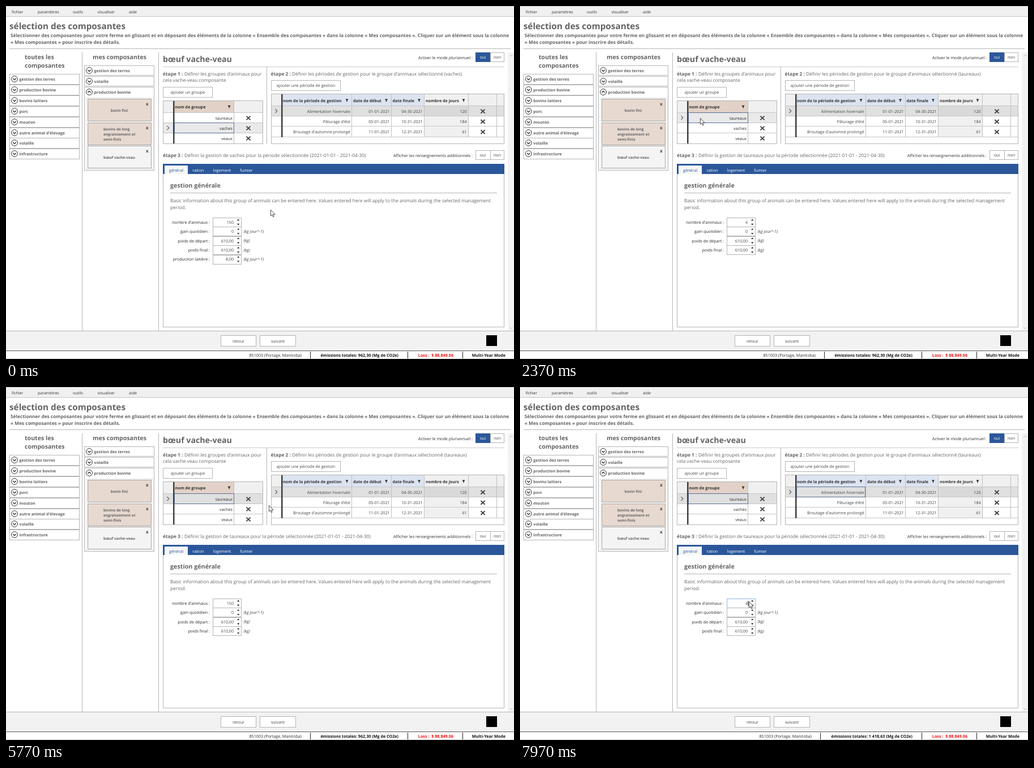
An HTML page for the animation above (8000 ms loop, 897 by 624 pixels).

```html
<!DOCTYPE html>
<html lang="fr">
<head>
<meta charset="utf-8">
<style>
html, body { margin: 0; width: 100%; height: 100%; overflow: hidden; background: #fff; }
svg { display: block; width: 897px; height: 624px; font: 7.2px "Open Sans", "Noto Sans", sans-serif; }
text { white-space: pre; text-rendering: geometricPrecision; }
</style>
</head>
<body>
<svg viewBox="0 0 897 624">
  <defs>
    <linearGradient id="navy" x2="0" y2="1"><stop stop-color="#285596"/><stop offset="1" stop-color="#133a75"/></linearGradient>
    <clipPath id="sub"><rect x="445" y="200" width="60" height="40"/></clipPath>
  </defs>
  <g id="still"></g>
  <g id="live"></g>
</svg>
<script>
const LOOP = 8000, BLUE = '#2b579a', GREY = '#646464', INK = '#2a2a2a', EDGE = '#b4b4b4';

// Drawing helpers, each returning SVG markup
const text = (s, x, y, o = {}) =>
  `<text x="${x}" y="${y}" font-size="${o.size || 7.2}" fill="${o.fill || INK}" text-anchor="${o.at || 'start'}"` +
  `${o.bold ? ' font-weight="700"' : ''}${o.italic ? ' font-style="italic"' : ''}>${s}</text>`;
const bold = (s, x, y, size = 7.2, fill = GREY, at) => text(s, x, y, { size, fill, at, bold: true });
const right = (s, x, y, fill) => text(s, x, y, { at: 'end', fill });
const mid = (s, x, y, fill) => text(s, x, y, { at: 'middle', fill });
const fill = (x, y, w, h, c) => `<rect x="${x}" y="${y}" width="${w}" height="${h}" fill="${c}"/>`;
const box = (x, y, w, h, c = '#fff', edge = EDGE) =>
  `<rect x="${x + .5}" y="${y + .5}" width="${w - 1}" height="${h - 1}" fill="${c}" stroke="${edge}"/>`;
const path = (d, c, w = 1, f = 'none') => `<path d="${d}" fill="${f}" stroke="${c}" stroke-width="${w}"/>`;
const hline = (x, y, x2, c = EDGE) => fill(x, y, x2 - x, 1, c);
const vline = (x, y, y2, c = EDGE) => fill(x, y, 1, y2 - y, c);
const button = (s, x, y, w, h) => box(x, y, w, h) + mid(s, x + w / 2, y + h / 2 + 2.6, '#444');
const funnel = (x, y) => path(`M${x - 2.7} ${y - 2.5}h5.4l-2 2.5v2.6l-1.4-.8v-1.8z`, 'none', 0, '#222');
const cross = (x, y) => path(`M${x - 3.6} ${y - 3.4}l7.2 6.8m0-6.8l-7.2 6.8`, '#444', 1.9);
const arrow = (x, y) => path(`M${x - 1.5} ${y - 3.5}l3.2 3.5l-3.2 3.5`, '#444', 1.1);

function accordion(s, x, y, w, h, up) {
  const k = up ? -1 : 1;
  return box(x, y, w, h) + `<circle cx="${x + 9}" cy="${y + 9}" r="5.4" fill="#fff" stroke="#333"/>` +
    path(`M${x + 6.4} ${y + 9 - k}l2.6 ${2.6 * k}l2.6 ${-2.6 * k}`, '#222', 1.3) + bold(s, x + 17.6, y + 12, 7.1);
}

function card(lines, y, c) {
  const first = y + 23 - (lines.length - 1) * 4.7;
  return box(144, y, 113, 40, c, '#a5a09c') + bold('x', 247, y + 12, 8, '#444') +
    lines.map((s, i) => lines.length > 1 ? bold(s, 172, first + i * 9.2, 6.5) : bold(s, 200, first, 6.5, GREY, 'middle')).join('');
}

function toggle(y, on) {
  return box(829, y, 27, 17, on ? BLUE : '#fff', on ? BLUE : EDGE) + box(855, y, 25, 17) +
    mid('oui', 842, y + 11.2, on ? '#fff' : '#444') + mid('non', 867.5, y + 11.2, '#444');
}

function drawStill() {
  let s = fill(0, 0, 897, 19, '#f0f0f0') + hline(0, 0, 897, '#c4c4c4') + hline(0, 18, 897, '#c4c4c4');
  [['fichier', 10], ['paramètres', 56], ['outils', 118], ['visualiser', 161.5], ['aide', 217]]
    .forEach(([w, x]) => s += text(w, x, 12.6, { size: 7, fill: '#333' }));
  s += bold('sélection des composantes', 6, 41, 15.3) +
    bold('Sélectionner des composantes pour votre ferme en glissant et en déposant des éléments de la colonne « Ensemble des composantes » dans la colonne « Mes composantes ». Cliquer sur un élément sous la colonne', 8, 55.3, 8.33) +
    bold('« Mes composantes » pour inscrire des détails.', 8, 66.8, 8.33) +
    hline(6, 75, 891) + vline(134, 82, 574) + vline(269, 82, 574);

  s += bold('toutes les', 33, 94, 10.6) + bold('composantes', 33, 109, 10.6) + bold('mes composantes', 153, 94, 10.6);
  ['gestion des terres', 'production bovine', 'bovins laitiers', 'porc', 'mouton', "autre animal d'élevage", 'volaille', 'infrastructure']
    .forEach((w, i) => s += accordion(w, 6, 120 + Math.round(i * 18.9), 124, 19));
  s += accordion('gestion des terres', 138, 105, 124, 18) + accordion('volaille', 138, 124, 124, 18) +
    accordion('production bovine', 138, 143, 124, 148, true) + box(141, 162, 119, 127, '#fff', '#e2e2e2') +
    card(['bovin fini'], 164, '#e7d9d0') + card(['bovins de long', 'engraissement et', 'semi-finis'], 206, '#e7d9d0') +
    card(['bœuf vache-veau'], 247, '#f4f4f4');

  s += bold('bœuf vache-veau', 277, 98.5, 14.2) + right('Activer le mode pluriannuel :', 824, 94) + toggle(82, true) +
    hline(277, 107, 880, '#cacaca') + vline(460, 108, 244) +
    bold('étape 1 :', 277, 122.6, 8.4) + text("Définir les groupes d'animaux pour", 315, 122.6, { size: 8.33, fill: GREY }) +
    text('cela vache-veau composante', 277, 134, { size: 8.33, fill: GREY }) + button('ajouter un groupe', 277, 143, 88, 19) +
    bold('étape 2 :', 467.5, 122.6, 8.4) + button('ajouter une période de gestion', 468, 131, 123, 19) +
    bold('étape 3 :', 277, 267.3, 8.4) + right('Afficher les renseignements additionnels :', 824, 267) + toggle(255, false);

  s += box(277, 279, 603, 289) + fill(277, 279, 603, 18, BLUE) + fill(280, 282, 41, 15, '#f7f7f7') +
    mid('général', 300.5, 292.6, BLUE);
  [['ration', 339.5], ['logement', 381.5], ['fumier', 424.5]].forEach(([w, x]) => s += mid(w, x, 292.6, '#fff'));
  s += bold('gestion générale', 290, 321, 10.74) + hline(290, 330, 867) +
    text('Basic information about this group of animals can be entered here. Values entered here will apply to the animals during the selected management', 290, 347, { size: 8.33, fill: GREY }) +
    text('period.', 290, 358.8, { size: 8.33, fill: GREY });

  s += fill(886, 82, 11, 492, '#f3f3f3') + path('M889.5 89l2.5-2.5l2.5 2.5M889.5 568l2.5 2.5l2.5-2.5', '#b5b5b5');
  s += fill(0, 574, 897, 35, '#f2f2f2') + hline(0, 574, 897) + button('retour', 379, 582, 63, 20) +
    button('suivant', 448, 582, 64, 20) + fill(848, 582, 19, 19, '#000') +
    hline(0, 609, 897, '#555') + hline(0, 623, 897, '#ccc') + vline(709, 611, 623, '#222') + vline(806, 611, 623, '#222') +
    bold('Loss :  $ 88,849.06', 790, 619.6, 7.2, '#f01010', 'end') + bold('Multi-Year Mode', 882, 619.6, 7.2, '#111', 'end');
  return s;
}

// Pointer path: [time, x, y], joined by monotone cubic curves
const KEYS = [[0, 467, 360], [200, 467, 360], [1000, 295, 200], [1130, 290, 199], [1400, 290, 199], [1800, 318, 198],
  [2570, 318, 198], [2630, 319, 200], [2800, 319, 200], [3270, 342, 207], [3600, 448, 208], [3800, 458, 209],
  [4600, 458, 209], [4670, 464, 209], [5770, 464, 209], [6060, 476, 222], [6270, 477, 196], [6570, 475, 187],
  [6600, 475, 187], [6830, 471, 216], [7400, 403, 381], [7600, 404, 379], [LOOP, 404, 379]];
const rate = (i, a) => (KEYS[i + 1][a] - KEYS[i][a]) / (KEYS[i + 1][0] - KEYS[i][0]);
function tangent(i, a) {
  if (!i || i === KEYS.length - 1) return 0;
  const p = rate(i - 1, a), q = rate(i, a);
  return p * q > 0 ? 2 * p * q / (p + q) : 0;
}
function pointer(t) {
  let i = 0;
  while (i < KEYS.length - 2 && t >= KEYS[i + 1][0]) i++;
  const A = KEYS[i], B = KEYS[i + 1], h = B[0] - A[0], u = (t - A[0]) / h, v = 1 - u;
  return [1, 2].map(a => A[a] * v * v * (1 + 2 * u) + B[a] * u * u * (3 - 2 * u) +
    h * u * v * (tangent(i, a) * v - tangent(i + 1, a) * u));
}

function groupTable(sel, hover, tint) {
  let s = box(277, 167, 177, 77) + fill(278, 168, 175, 21, '#f0f0f0') + fill(297, 168, 105, 21, '#e2d1c6') +
    bold('nom de groupe', 298.5, 181, 7.2, '#333') + funnel(394, 178.3);
  ['taureaux', 'vaches', 'veaux'].forEach((w, i) => {
    const y = 189 + i * 18, c = i === sel ? tint : i === hover ? '#c3c3c3' : '#fff';
    s += fill(278, y, 175, 18, c) + hline(278, y - 1, 453, '#c6c6c6') + right(w, 400, y + 11.7) + cross(428, y + 9);
    if (i === sel) s += arrow(286, y + 8.5);
  });
  s += vline(402, 168, 243, '#c0c0c0') + fill(295, 168, 2.5, 75, '#3c3c3c');
  return s + box(297, 188 + sel * 18, 106, 19, 'none', '#5a6f96');
}

function periodTable(sel, hover, focus) {
  const cols = [610, 680, 738, 816, 866];
  let s = box(468, 155, 412, 89) + fill(469, 156, 410, 21, '#f0f0f0') + fill(488, 156, 250, 21, '#dce4f1');
  [['nom de la période de gestion', 489, 602], ['date de début', 613, 671.5], ['date finale', 682.5, 729.5], ['nombre de jours', 741, 808]]
    .forEach(([w, x, f]) => s += bold(w, x, 169.8, 7.2, '#333') + funnel(f, 167));
  [['Alimentation hivernale', '01-01-2021', '04-30-2021', 120], ["Pâturage d'été", '05-01-2021', '10-31-2021', 184],
    ["Broutage d'automne prolongé", '11-01-2021', '12-31-2021', 61]].forEach((row, i) => {
    const y = 177 + i * 18.2, on = i === sel, over = !on && i === hover;
    s += fill(469, y, 410, 18.2, on ? '#e0e0e0' : over ? '#c3c3c3' : '#fff');
    if (!over) s += fill(738, y, 78, 18.2, on ? '#d9d9d9' : '#f0f0f0');
    s += hline(469, Math.round(y) - 1, 879, '#c6c6c6') + cross(842, y + 9.2);
    row.forEach((w, k) => s += right(w, cols[k] - 2.3, y + 12, '#444'));
    if (on) s += arrow(477, y + 8.5);
  });
  s += hline(469, 231, 879, '#c6c6c6');
  cols.forEach(x => s += vline(x, 156, 232, '#c0c0c0'));
  s += fill(486, 156, 2.5, 76, '#3c3c3c');
  return focus ? s + box(488, 176, 122, 19, 'none', '#5a6f96') : s;
}

function form(values, milk, focus) {
  const rows = [["nombre d'animaux :", ''], ['gain quotidien :', '(kg jour^-1)'], ['poids de départ :', '(kg)'],
    ['poids final :', '(kg)'], ['production laitière :', '(kg jour^-1)']];
  return rows.slice(0, milk ? 5 : 4).map(([label, unit], i) => {
    const y = 382 + i * 16.4, top = Math.round(y - 8);
    return right(label, 360, y + 2.8) + box(365, top, 51, 17, '#fff', i === 0 && focus ? '#8fb4e6' : EDGE) +
      right(values[i], 402, y + 2.8, '#444') + text(unit, 419.5, y + 2.6, { italic: true, fill: '#444' }) +
      path(`M408 ${y - 2.8}h4.4l-2.2-2.6zM408 ${y + 2.8}h4.4l-2.2 2.6z`, 'none', 0, '#222');
  }).join('') + (focus ? vline(402.5, 378, 387, '#222') : '');
}

function menu(t, x) {
  const slide = Math.min(1, (t - 3200) / 150), lit = t > 2900;
  let s = box(319, 200, 127, 35) + (lit ? fill(320, 201, 125, 16, 'url(#navy)') : '') +
    text('copier la gestion de', 338, 212, { fill: lit ? '#fff' : INK }) +
    path('M436 206l5 3l-5 3z', 'none', 0, lit ? '#fff' : INK) + text('Supprimer tous les groupes', 338, 228.5);
  if (slide > 0) {
    const on = x > 445;
    s += `<g clip-path="url(#sub)"><g transform="translate(${46 * (slide - 1)} 0)">` + box(445, 201, 46, 34) +
      (on ? fill(446, 202, 44, 16, '#3f6fba') : '') + text('vaches', 464.5, 213.4, { fill: on ? '#fff' : INK }) +
      text('veaux', 464.5, 229.7) + '</g></g>';
  }
  return s;
}

function footer(total, red) {
  const shift = total.length > 6 ? -7 : 0;
  return bold(`émissions totales: ${total} (Mg de CO2e)`, 693, 619.6, 7.2, red ? '#f01010' : '#111', 'end') +
    vline(537 + shift, 611, 623, '#222') + right('851003 (Portage, Manitoba)', 522 + shift, 619.6);
}

function drawLive(t) {
  const [x, y] = pointer(t), open = t >= 2800 && t < 5770;
  const cows = t < 2330, name = cows ? 'vaches' : 'taureaux';
  const autumn = t >= 6070 && t < 6580;
  const period = t < 6070 || t >= 6570 ? 0 : t < 6240 ? 2 : -1;
  const rowAt = (left, end, top, h) => !open && x >= left && x < end ? Math.floor((y - top) / h) : -1;
  const typed = ['15', '1', '', '4'][Math.min(3, Math.floor((t - 7870) / 33))];
  const count = cows ? '150' : t < 5770 ? '4' : t < 7870 ? '150' : typed;
  const weight = autumn ? '610' : '610,00';
  const span = autumn ? '2021-11-01 - 2021-12-31' : '2021-01-01 - 2021-04-30';
  const plain = { size: 8.33, fill: GREY };

  return text(`Définir les périodes de gestion pour le groupe d'animaux sélectionné (${name})`, 505, 122.6, plain) +
    text(`Définir la gestion de ${name} pour la période sélectionnée (${span})`, 315, 267.3, plain) +
    groupTable(t < 2230 ? 1 : 0, rowAt(277, 453, 189, 18), t < 5770 ? '#e9e9e9' : '#e0e0e0') +
    periodTable(period, rowAt(468, 880, 177, 18.2), t >= 6570) +
    form([count, '0', weight, weight, '8,00'], cows, t >= 7430) +
    footer(t < 6000 ? '962,30' : '1 418,63', t >= 6000 && t < 6700) + (open ? menu(t, x) : '') +
    `<g transform="translate(${x} ${y})">` +
    path('M.4 .4V11.2L2.9 8.9L4.6 12.8L6.2 12.1L4.6 8.3H8z', '#222', .8, '#fff') + '</g>';
}

const live = document.getElementById('live');
document.getElementById('still').innerHTML = drawStill();
const start = performance.now();
function frame() {
  live.innerHTML = drawLive((performance.now() - start) % LOOP);
  requestAnimationFrame(frame);
}
frame();
</script>
</body>
</html>
```
